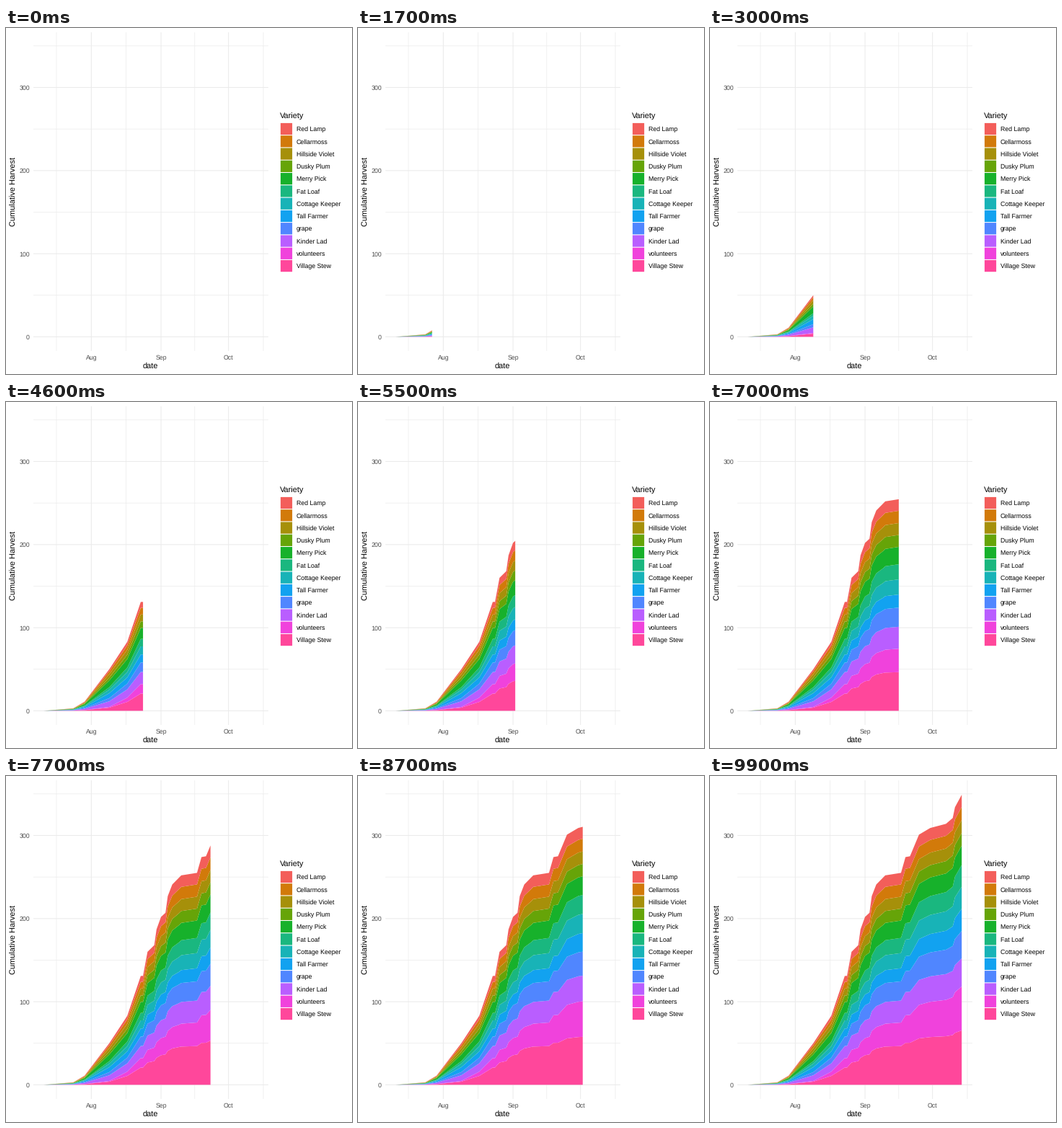
Recreate the animation shown at these times as a matplotlib script. Size 480 by 480 pixels, loop 10 s.

```python
import numpy as np
import matplotlib.pyplot as plt
from matplotlib.animation import FuncAnimation
from matplotlib.patches import Polygon, Rectangle

SIZE, DPI = 480, 100
FRAMES, INTERVAL = 100, 100
LAST_DAY = 95
LEFT, RIGHT, TOP, BOTTOM = 38, 364, 6, 448

plt.rcParams["font.family"] = "Liberation Sans"
plt.rcParams["text.hinting"] = "none"

# Bends of the cumulative harvest curve: (day, total); day 0 is 11 July.
BENDS = [(0, 0), (13, 3), (18, 11), (29, 50), (37, 83), (43, 131), (44, 131),
         (46, 160), (49, 168), (50, 187), (52, 202), (54, 207), (55, 227),
         (57, 241), (61, 252), (68, 255), (70, 274), (72, 275), (76, 301),
         (81, 309), (88, 314), (91, 321), (92, 334), (95, 349)]

# Name, colour and relative share early, midway and at the end, top layer first.
CHECK_DAYS = [29, 60, 95]
VARIETIES = [
    ("Red Lamp", "#F35E5A", (3, 16, 17)),
    ("Cellarmoss", "#D27A0A", (4, 17, 18)),
    ("Hillside Violet", "#A6900A", (5, 16.5, 18)),
    ("Dusky Plum", "#66A408", (4, 16.5, 17.5)),
    ("Merry Pick", "#17B12B", (9.5, 24, 27)),
    ("Fat Loaf", "#1AB77F", (3.5, 20.5, 30)),
    ("Cottage Keeper", "#18B3B7", (5, 20.5, 30.5)),
    ("Tall Farmer", "#12A2F0", (7, 17.5, 31)),
    ("grape", "#5086FF", (4.5, 26, 38)),
    ("Kinder Lad", "#B95EFF", (8, 30, 39)),
    ("volunteers", "#F042DC", (1, 31, 61)),
    ("Village Stew", "#FF479B", (4.5, 52.5, 75.5)),
]


def px(day):
    return 52.8 + 3.12 * day


def py(value):
    return 428.4 - 1.153 * value


def layer_edges():
    """Stacked boundaries per day, from the baseline up."""
    total = np.interp(np.arange(LAST_DAY + 1), *zip(*BENDS))
    check = total[CHECK_DAYS]
    shares = np.array([share for *_, share in reversed(VARIETIES)], float)
    amounts = shares / shares.sum(axis=0) * check
    layers = [np.interp(total, [0, *check], [0, *row]) for row in amounts]
    return np.vstack([np.zeros_like(total), np.cumsum(layers, axis=0)])


fig = plt.figure(figsize=(SIZE / DPI, SIZE / DPI), dpi=DPI, facecolor="white")
ax = fig.add_axes([0, 0, 1, 1])
ax.set(xlim=(0, SIZE), ylim=(SIZE, 0))
ax.axis("off")


def label(x, y, text, size=8.8, color="black", ha="center", va="baseline", **kw):
    ax.text(x, y, text, fontsize=size * 72 / DPI, color=color, ha=ha, va=va, **kw)


def grid_line(xs, ys, width):
    ax.plot(xs, ys, color="#EBEBEB", lw=width * 72 / DPI, zorder=1,
            solid_capstyle="butt", snap=False)


def draw_grid():
    for day in (5.5, 36.5, 67, 97.5):
        grid_line([px(day)] * 2, [TOP, BOTTOM], 0.7)
    for value in range(50, 351, 100):
        grid_line([LEFT, RIGHT], [py(value)] * 2, 0.7)
    for day, month in ((21, "Aug"), (52, "Sep"), (82, "Oct")):
        grid_line([px(day)] * 2, [TOP, BOTTOM], 1.07)
        label(px(day), 460.2, month, color="#4D4D4D")
    for value in range(0, 301, 100):
        grid_line([LEFT, RIGHT], [py(value)] * 2, 1.07)
        label(33, py(value) + 3.4, str(value), color="#4D4D4D", ha="right")
    label(200.7, 473, "date", 11)
    label(11, 226.5, "Cumulative Harvest", 11, rotation=90, va="center")


def draw_legend():
    label(379.7, 125.3, "Variety", 11, ha="left")
    for i, (name, color, _) in enumerate(VARIETIES):
        y = 140 + 17.28 * i
        ax.add_patch(Rectangle((380.9, y - 8.1), 16.2, 16.2, fc=color, lw=0,
                               snap=False))
        label(403, y + 3.2, name, ha="left")


draw_grid()
draw_legend()

edges = py(layer_edges())
xs = px(np.arange(LAST_DAY + 1))
areas = [ax.add_patch(Polygon([[0, 0]], fc=color, lw=0, zorder=3))
         for _, color, _ in reversed(VARIETIES)]


def update(frame):
    """Reveal the areas up to the nearest whole day."""
    day = round(LAST_DAY * frame / (FRAMES - 1))
    x = xs[:day + 1]
    for area, low, high in zip(areas, edges[:, :day + 1], edges[1:, :day + 1]):
        area.set_visible(day > 0)
        area.set_xy(np.column_stack([np.r_[x, x[::-1]], np.r_[high, low[::-1]]]))
    return areas


anim = FuncAnimation(fig, update, frames=FRAMES, interval=INTERVAL,
                     init_func=lambda: update(0), repeat=True, repeat_delay=0)
plt.show()
```
